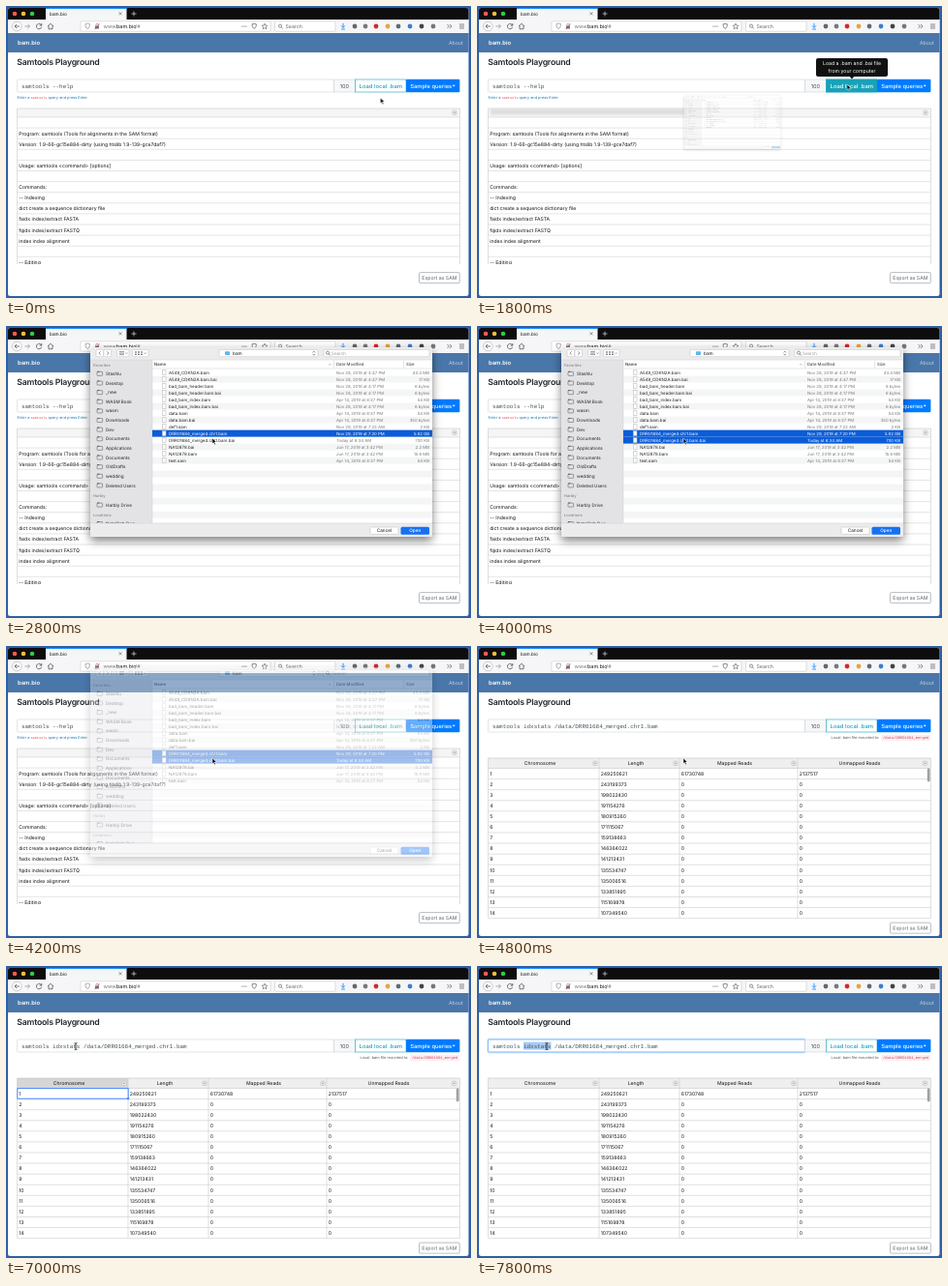
Write an HTML page that moves like this. It is 480x302 px and loops after 8 s.

```html
<!DOCTYPE html>
<html lang="en">
<head>
<meta charset="utf-8">
<title>Samtools Playground</title>
<style>
html, body { margin: 0; width: 100%; height: 100%; overflow: hidden; background: #2d5fa6; }
svg { display: block; width: 480px; height: 302px; }
text { font: 5.1px Inter, sans-serif; fill: #111; white-space: pre; text-rendering: geometricPrecision; }
.mono { font-family: "Liberation Mono", monospace; }
.mid { text-anchor: middle; }
.end { text-anchor: end; }

.help, .stats, .hover, .tip, .streak, .dialog, .pick1, .pick2, .cell, .focus, .word, .export, .arrow, .beam {
  animation: 8s step-end infinite;
}
.stats, .hover, .tip, .streak, .dialog, .pick1, .pick2, .cell, .focus, .word, .beam { opacity: 0; }
.help { animation-name: help; }
.stats { animation-name: stats; }
.hover { animation-name: hover; }
.tip { animation-name: tip; }
.streak { animation-name: streak; }
.dialog { animation-name: dialog; transform-origin: 263.5px 120px; }
.pick1 { animation-name: pick1; }
.pick2 { animation-name: pick2; }
.cell { animation-name: cell; }
.focus { animation-name: focus; }
.word { animation-name: word; }
.export { animation-name: export; }
.arrow { animation-name: arrow; }
.beam { animation-name: beam; }

@keyframes help { 0% { opacity: 1 } 57.5% { opacity: 0 } }
@keyframes stats { 0% { opacity: 0 } 57.5% { opacity: 1 } }
@keyframes hover { 0%, 30% { opacity: 0 } 7.5% { opacity: 1 } }
@keyframes tip { 0%, 27.5% { opacity: 0 } 7.5% { opacity: .6 } 10% { opacity: 1 } }
@keyframes streak { 0%, 25% { opacity: 0 } 22.5% { opacity: 1 } }
@keyframes dialog {
  0% { opacity: 0; transform: scale(.283) }
  22.5% { opacity: .3; transform: scale(.283) }
  25% { opacity: .85; transform: scale(.85) }
  27.5% { opacity: 1; transform: none }
  52.5% { opacity: .4; transform: none }
  55% { opacity: 0; transform: none }
}
@keyframes pick1 { 0% { opacity: 0 } 35% { opacity: 1 } }
@keyframes pick2 { 0% { opacity: 0 } 37.5% { opacity: 1 } }
@keyframes cell { 0%, 90% { opacity: 0 } 75% { opacity: 1 } }
@keyframes focus { 0% { opacity: 0 } 90% { opacity: 1 } }
@keyframes word { 0% { opacity: 0 } 92.5% { opacity: 1 } }
@keyframes export { 0% { transform: none } 57.5% { transform: translateY(10.6px) } }
@keyframes arrow {
  0% { transform: translate(386.5px, 95px) }
  5% { transform: translate(385px, 91px) }
  7.5% { transform: translate(383px, 85px) }
  10% { transform: translate(382px, 81px) }
  27.5% { transform: translate(290px, 103px) }
  30% { transform: translate(214px, 111px) }
  35% { transform: translate(213px, 116px) }
  65% { transform: translate(180px, 123px) }
  67.5% { transform: translate(136px, 131px) }
  70% { transform: translate(113.5px, 133px) }
  82.5% { transform: translate(106px, 119px) }
  85% { transform: translate(86px, 98px) }
  87.5% { transform: translate(72px, 83px); opacity: 0 }
}
@keyframes beam { 0% { opacity: 0 } 87.5% { opacity: 1 } }
</style>
</head>
<body>
<svg id="stage" viewBox="0 0 480 302"></svg>
<script>
const rect = (x, y, w, h, fill, more = '') =>
  `<rect x="${x}" y="${y}" width="${w}" height="${h}" fill="${fill}" ${more}/>`;
const box = (x, y, w, h, fill, stroke, r = 0) =>
  rect(x, y, w, h, fill, `stroke="${stroke}" stroke-width=".6" rx="${r}"`);
const dot = (x, y, r, fill) => `<circle cx="${x}" cy="${y}" r="${r}" fill="${fill}"/>`;
const line = (d, color = '#555', w = .8) =>
  `<path d="${d}" fill="none" stroke="${color}" stroke-width="${w}"/>`;
// y is the vertical middle of the text
const text = (x, y, s, style = '', cls = '') =>
  `<text x="${x}" y="${y}" dy=".36em" class="${cls}" style="${style}">${s.replace(/</g, '&lt;')}</text>`;
const group = (cls, ...parts) => `<g class="${cls}">${parts.join('')}</g>`;
const size = (px, color = '#111', weight = 400) => `font-size:${px}px;fill:${color};font-weight:${weight}`;
const drop = (x, y) => box(x - 2.2, y - 2.2, 4.4, 4.4, '#eee', '#bbb', 1) +
  `<path d="M${x - 1.1} ${y - .6}h2.2l-1.1 1.5z" fill="#888"/>`;
const lens = (x, y) => `<circle cx="${x}" cy="${y}" r="1.6" fill="none" stroke="#666" stroke-width=".7"/>` +
  line(`M${x + 1.2} ${y + 1.2}l1.6 1.6`, '#666');

function browser() {
  const tools = [[360, '#666'], [371, '#777'], [382, '#d7262b'], [394, '#e8a33a'],
    [405, '#5b6b7b'], [417, '#3b7fd0'], [429, '#444'], [441, '#777']];
  return [
    rect(2, 2, 475.5, 298, '#fff', 'rx="2.5"'),
    `<path d="M2 14V4.5a2.5 2.5 0 0 1 2.5-2.5H475a2.5 2.5 0 0 1 2.5 2.5V14z" fill="#0d0d10"/>`,
    dot(9, 8, 2.3, '#fc5b57'), dot(18, 8, 2.3, '#fdbc40'), dot(27, 8, 2.3, '#34c84a'),
    rect(41, 2, 83.5, 12, '#f5f6f7'), rect(41, 2, 83.5, .9, '#0a84ff'),
    text(45, 8, 'bam.bio', size(4.7)), line('M116.5 6.3l3 3m0-3l-3 3', '#555', .6),
    line('M129.5 8h5m-2.5-2.5v5', '#ddd', .7),
    rect(2, 14, 475.5, 14, '#f6f6f8'),
    box(6.5, 16.2, 9.6, 9.6, '#fff', '#aaa', 4.8),
    line('M14 21H9m2.2-2.2L9 21l2.2 2.2'), line('M19.5 21h5m-2.2-2.2l2.2 2.2-2.2 2.2', '#999'),
    line('M36.6 20a2.7 2.7 0 1 0 .1 1.8M36.8 18v2.2h-2.2'),
    line('M43 21l3-2.8 3 2.8m-5-.6v3.4h4v-3.4'),
    box(77, 15.8, 196, 10.4, '#fff', '#ccc', 1),
    line('M82 18.6l2.2-.6 2.2.6c0 3-1 4.4-2.2 5.2-1.2-.8-2.2-2.2-2.2-5.2z', '#777', .6),
    rect(92, 20.5, 4, 3, '#777'), line('M92.9 20.5v-1.2a1.1 1.1 0 0 1 2.2 0v1.2', '#777', .6),
    line('M91.6 24l5-5.6', '#e22850', .7),
    text(100.5, 21, 'www.<tspan>'.slice(0, 4), size(5.4, '#777')),
    text(114, 21, 'bam.bio', size(5.4)), text(133.2, 21, '/#', size(5.4, '#777')),
    dot(244, 21, .6, '#555'), dot(246, 21, .6, '#555'), dot(248, 21, .6, '#555'),
    line('M254 18.8l2.2-.5 2.2.5c0 2.6-1 4-2.2 4.6-1.2-.6-2.2-2-2.2-4.6z', '#555', .7),
    line('M267 18.1l.9 2 2 .2-1.5 1.4.5 2.1-1.9-1.1-1.9 1.1.5-2.1-1.5-1.4 2-.2z', '#555', .6),
    box(277.5, 15.8, 62.5, 10.4, '#fff', '#ccc', 1),
    lens(283, 20.6), text(288.5, 21, 'Search', size(5.2, '#666')),
    line('M348 17.8v4.4m-2-1.8l2 2 2-2m-4 3.6h4', '#0a7cff'),
    ...tools.map(([x, c]) => dot(x, 21, 2.4, c)),
    line('M455.5 19l2 2-2 2m2.5-4l2 2-2 2', '#555', .7),
    line('M468 19h5m-5 2h5m-5 2h5', '#555', .7),
    rect(2, 28, 475.5, 20, '#4a77aa'),
    text(12, 38.2, 'bam.bio', size(5.9, '#fff', 600)),
    text(457, 38.2, 'About', size(5.2, '#c3d2e4'))
  ].join('');
}

function controls() {
  const load = color => text(386.8, 82.6, 'Load local .bam', size(5.9, color, 500), 'mid');
  const cmd = s => text(16, 82.6, s, size(5.93, '#495057'), 'mono');
  return [
    text(11.3, 58, 'Samtools Playground', size(8.7, '#212529', 600) + ';letter-spacing:-.2px'),
    box(11.5, 76, 327, 13, '#fff', '#ced4da', 1),
    group('focus', rect(10.9, 75.4, 328.2, 14.2, 'none', 'stroke="#c5e0ff" stroke-width="1.2" rx="1.6"'),
      rect(11.5, 76, 327, 13, 'none', 'stroke="#6fb2fb" stroke-width=".7" rx="1"')),
    group('word', rect(48, 78.6, 28.5, 8, '#a9cbf3')),
    box(338.5, 76, 22, 13, '#f6f7f8', '#ced4da'),
    text(349.3, 82.6, '100', size(5.6, '#555'), 'mid'),
    box(360.5, 76, 52.5, 13, '#fff', '#17a2b8'), load('#17a2b8'),
    group('hover', box(360.5, 76, 52.5, 13, '#17a2b8', '#17a2b8'), load('#fff')),
    rect(413, 75.7, 55.4, 13.6, '#007bff', 'rx="1"'),
    text(417.3, 82.6, 'Sample queries', size(5.8, '#fff', 500)),
    '<path d="M460.6 81.8h3.2l-1.6 1.8z" fill="#fff"/>',
    group('help', cmd('samtools --help'),
      `<text x="11.5" y="96" style="${size(3.9, '#1679b0')}">Enter a <tspan class="mono" style="fill:#e83e5c;font-size:3.5px">samtools</tspan> query and press Enter</text>`),
    group('stats', cmd('samtools idxstats /data/DRR01684_merged.chr1.bam'),
      text(415.5, 94.6, 'Local .bam file mounted to:', size(3.9, '#555'), 'end'),
      rect(417, 91.5, 51.4, 6.4, '#faeef1', 'rx="1"'),
      text(419, 94.6, '/data/DRR01684_merged', size(3.75, '#e0355a'), 'mono'))
  ].join('');
}

function helpTable() {
  const rows = ['', 'Program: samtools (Tools for alignments in the SAM format)',
    'Version: 1.9-66-gc15e884-dirty (using htslib 1.9-139-gce7daf7)', '',
    'Usage: samtools <command> [options]', '', 'Commands:', '-- Indexing',
    'dict create a sequence dictionary file', 'faidx index/extract FASTA',
    'fqidx index/extract FASTQ', 'index index alignment', '', '-- Editing'];
  return group('help', '<g clip-path="url(#helpClip)">',
    rect(11.5, 106, 457, 9, '#f5f5f6'),
    ...rows.map((s, i) => line(`M11.5 ${115 + 11.1 * i}H468.5`, '#d2d2d4', .6) +
      text(13.2, 120.7 + 11.1 * i, s)), '</g>',
    line('M11.5 267V106H468.5V267', '#ccc', .6), drop(463, 110.3),
    group('streak', rect(14, 106.5, 200, 6, '#dedede', 'filter="url(#soft)"')));
}

function statsTable() {
  const edges = [11.5, 126, 209, 331, 468.5];
  const heads = [['Chromosome', 65], ['Length', 164], ['Mapped Reads', 266], ['Unmapped Reads', 395]];
  const lengths = [249250621, 243199373, 198022430, 191154276, 180915260, 171115067, 159138663,
    146364022, 141213431, 135534747, 135006516, 133851895, 115169878, 107349540];
  const head = ([s, x], i) => text(x, 121.3, s, '', 'mid') + drop(edges[i + 1] - (i > 2 ? 6 : 4), 121.3);
  return group('stats', rect(11.5, 116, 457, 10.5, '#efeff0'),
    group('cell', rect(11.5, 116, 114.5, 10.5, '#d6d6d8')),
    ...heads.map(head),
    ...lengths.map((n, i) => {
      const y = 132 + 11.08 * i;
      const cells = [i + 1, n, i ? 0 : 61730748, i ? 0 : 2137517];
      return line(`M11.5 ${y + 5.6}H468.5`, '#ccc', .6) +
        cells.map((v, c) => text(edges[c] + 1.8, y, String(v))).join('');
    }),
    line('M11.5 116H468.5M11.5 126.4H468.5', '#c4c4c6', .6),
    ...edges.map(x => line(`M${x} 116V281.6`, '#ccc', .6)),
    rect(464.8, 126.5, 2.8, 14, '#a0a0a2', 'rx="1.4"'),
    group('cell', rect(11.8, 126.6, 114.4, 10.6, 'none', 'stroke="#4b89ff" stroke-width="1"'),
      rect(125, 136, 2.2, 2.2, '#4b89ff')));
}

function tooltip() {
  return group('tip', rect(350, 54, 74, 19, '#111', 'rx="2"'),
    '<path d="M384.8 73h4.4l-2.2 2.4z" fill="#111"/>',
    text(387, 59.6, 'Load a .bam and .bai file', size(5.2, '#fff'), 'mid'),
    text(387, 67.3, 'from your computer', size(5.2, '#fff'), 'mid'));
}

function dialog() {
  const nov = 'Nov 28, 2019 at 4:47 PM', low = 'Nov 28, 2019 at 4:17 PM';
  const apr = 'Apr 14, 2019 at 8:37 PM', jun = 'Jun 17, 2019 at 3:42 PM';
  const files = [
    ['A549_CDKN2A.bam', nov, '43.4 MB'], ['A549_CDKN2A.bam.bai', nov, '17 KB'],
    ['bad_bam_header.bam', low, '6 bytes'], ['bad_bam_header.bam.bai', low, '6 bytes'],
    ['bad_bam_index.bam', apr, '54 KB'], ['bad_bam_index.bam.bai', low, '6 bytes'],
    ['data.bam', apr, '54 KB'], ['data.bam.bai', apr, '350 bytes'],
    ['def1.sam', 'Nov 29, 2019 at 7:23 AM', '2 KB'],
    ['DRR01684_merged.chr1.bam', 'Nov 29, 2019 at 7:20 PM', '5.82 GB'],
    ['DRR01684_merged.chr1.bam.bai', 'Today at 6:34 AM', '700 KB'],
    ['NA12878.bai', jun, '2.2 MB'], ['NA12878.bam', jun, '15.6 MB'], ['test.sam', apr, '54 KB']];
  const places = ['Stashlu', 'Desktop', '_new', 'WASM Book', 'wasm', 'Downloads', 'Dev', 'Documents',
    'Applications', 'Documents', 'OldDrafts', 'wedding', 'Deleted Users'];
  const row = ([name, date, bytes], i, on) => {
    const y = 48.1 + 7 * i, ink = on ? '#fff' : '#222', dim = on ? '#fff' : '#777';
    return (on ? rect(151, y - 3.5, 289, 7, '#0a5cd8') : '') +
      box(161.4, y - 2.4, 3.6, 4.8, '#fff', '#bbb') +
      text(168, y, name, size(4.45, ink)) + text(341, y, date, size(4.3, dim)) +
      text(437, y, bytes, size(4.3, dim), 'end');
  };
  const place = (s, y) => box(94, y - 1.9, 5.6, 4, 'none', '#666', .6) +
    line(`M94 ${y - 2}h2.4`, '#666', 1) + text(103, y, s, size(4.6, '#222'));
  const label = (s, y) => text(90, y, s, size(4, '#888', 500));
  const key = (x, w) => box(x, 24.4, w, 7.4, '#fff', '#c6c6c6', 1.2);
  return group('dialog', rect(87, 22, 353, 196, '#ececed', 'rx="2" filter="url(#shadow)"'),
    key(93, 7.6), key(101, 7.6), line('M97.6 26.3l-1.7 1.8 1.7 1.8m6.6-3.6l1.7 1.8-1.7 1.8', '#666', .7),
    key(114.5, 12.5), line('M117 26.6h5m-5 1.5h5m-5 1.5h5', '#555', .6), line('M123.6 27.6l.9 1 .9-1', '#555', .6),
    key(130.5, 16.5), line('M133 27h2m1 0h2m1 0h2m-8 2.2h2m1 0h2m1 0h2', '#555', 1.1), line('M142.8 27.6l.9 1 .9-1', '#555', .6),
    key(220, 102), rect(226, 26.2, 5, 3.8, '#5fb8ea', 'rx=".6"'), text(234, 28.1, 'bam', size(4.7)),
    line('M316.6 27.4l1.2-1.3 1.2 1.3m0 1.5l-1.2 1.3-1.2-1.3', '#444', .6),
    key(328, 109), lens(332, 27.7), text(336, 28.1, 'Search', size(4.5, '#999')),
    rect(87, 35, 64, 169, '#e3e2e5'), rect(151, 35, 289, 169, '#fff'),
    ...Array.from({length: 11}, (_, i) => rect(151, 51.6 + 14 * i, 289, 7, '#f4f5f5')),
    line('M87 35H440M151 44H440M87 204H440M151 35V204M338.5 35.5V44M410.5 35.5V44', '#cfcfd1', .5),
    text(153, 39.8, 'Name', size(4.3, '#333', 500)), line('M333 40.4l1.2-1.2 1.2 1.2', '#777', .5),
    text(341, 39.8, 'Date Modified', size(4.3, '#333')), text(413, 39.8, 'Size', size(4.3, '#333')),
    ...files.map((f, i) => row(f, i)),
    group('pick1', row(files[9], 9, true)), group('pick2', row(files[10], 10, true)),
    label('Favorites', 41), ...places.map((s, i) => place(s, 49.3 + 9.63 * i)),
    label('Harbly', 176), place('Harbly Drive', 185), label('Locations', 196),
    '<g clip-path="url(#sideClip)">', place('NoteSlab Duo', 204.5), '</g>',
    box(376, 208, 29, 7.4, '#fff', '#c4c4c4', 1.4), text(390.5, 211.8, 'Cancel', size(4.7), 'mid'),
    rect(407.5, 207.7, 29.5, 8, '#1672f0', 'rx="1.5"'), text(422.2, 211.8, 'Open', size(4.7, '#fff', 500), 'mid'));
}

const exportButton = group('export', box(426.5, 275.6, 41.8, 11, '#fff', '#868e96', 1.2),
  text(447.4, 281.2, 'Export as SAM', size(5.2, '#5c646b'), 'mid'));
const pointer = group('arrow',
  '<path d="M0 0v5.6l1.3-1.1 1 2.2 1-.5-1-2.1h1.8z" fill="#000" stroke="#fff" stroke-width=".5"/>');
const beam = group('beam', line('M70.6 79.6q1.4 0 1.4 1v5q0 1-1.4 1m2.8-7q-1.4 0-1.4 1m0 5q0 1 1.4 1', '#111', .8));

document.getElementById('stage').innerHTML = `<defs>
  <clipPath id="helpClip"><rect x="11" y="105" width="458" height="162"/></clipPath>
  <clipPath id="sideClip"><rect x="87" y="198" width="64" height="6"/></clipPath>
  <filter id="soft"><feGaussianBlur stdDeviation="1"/></filter>
  <filter id="shadow" x="-10%" y="-10%" width="120%" height="125%">
    <feDropShadow dx="0" dy="4" stdDeviation="5" flood-opacity=".5"/></filter>
</defs>` + rect(0, 0, 480, 302, '#2d5fa6') + browser() + controls() + helpTable() + statsTable() +
  exportButton + tooltip() + dialog() + pointer + beam;
</script>
</body>
</html>
```
